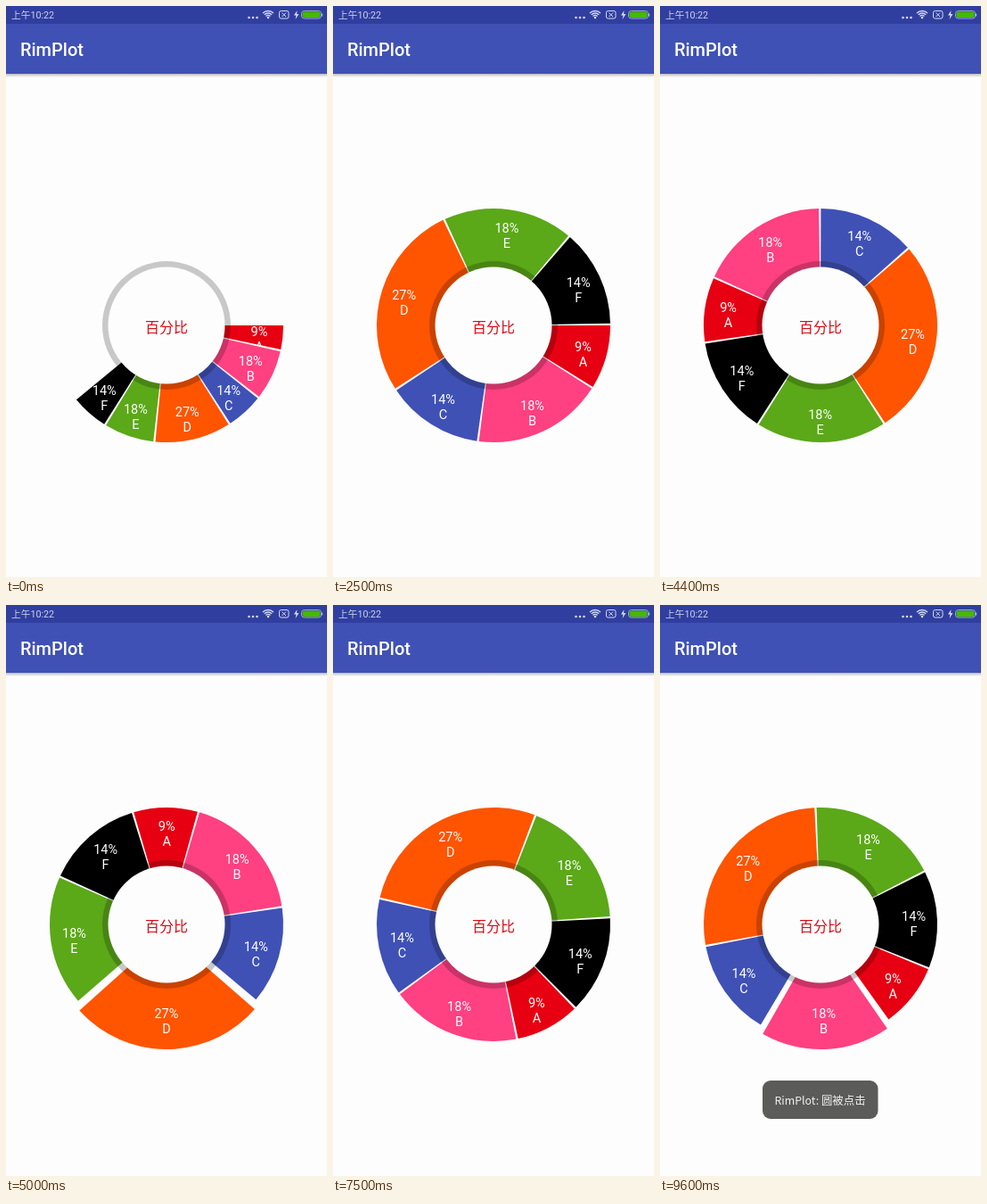
Animation of 360x640 px, one loop 9700 ms. Source, as an HTML page with a canvas:

```html
<!DOCTYPE html>
<html lang="zh">
<head>
<meta charset="utf-8">
<style>
  html, body { margin: 0; width: 100%; height: 100%; overflow: hidden; background: #fdfdfd; }
  canvas { display: block; }
</style>
</head>
<body>
<canvas id="stage" width="360" height="640"></canvas>
<script>
const c = document.getElementById('stage').getContext('2d');
const LOOP = 9700, CX = 180, CY = 358, OUTER = 131, GAP = 1, POP = 9, SPEED = 0.19;
const RAD = Math.PI / 180;
const LATIN = 'Roboto, sans-serif';
const CJK = '"Noto Sans CJK SC", "Noto Sans CJK", sans-serif';
const NAME = 'RimPlot';

const slices = [
  ['A', 1, '#e60012'], ['B', 2, '#ff4081'], ['C', 1.5, '#3f51b5'],
  ['D', 3, '#ff5400'], ['E', 2, '#5ba818'], ['F', 1.5, '#000']
];
const total = slices.reduce((sum, s) => sum + s[1], 0);

// Turns at constant speed: start time, target angle, slice that pops out on arrival
const turns = [[3155, 172, 'E'], [4400, 253.7, 'D'], [5350, 112.6, 'F'], [7150, 22.6, 'B']];

function pose(t) {
  let angle = 0, popped = '';
  for (const [start, target, name] of turns) {
    if (t < start) break;
    const way = target - angle, step = (t - start) * SPEED;
    const done = step >= Math.abs(way);
    angle = done ? target : angle + Math.sign(way) * step;
    popped = done ? name : '';
  }
  return { angle, popped, sweep: Math.min(360, 141.5 + t * 0.36) };
}

function text(str, x, y, font, color, align = 'center') {
  c.font = font;
  c.fillStyle = color;
  c.textAlign = align;
  c.fillText(str, x, y);
}

function disc(x, y, r, color) {
  c.beginPath();
  c.arc(x, y, r, 0, 2 * Math.PI);
  c.fillStyle = color;
  c.fill();
}

function box(x, y, w, h, r) {
  c.beginPath();
  c.roundRect(x, y, w, h, r);
}

function pie(t) {
  const { angle, popped, sweep } = pose(t);
  let from = angle;
  for (const [name, value, color] of slices) {
    const to = from + sweep * value / total, mid = (from + to) / 2 * RAD;
    const dx = Math.cos(mid), dy = Math.sin(mid);
    const shift = name === popped ? POP : 0;
    const x = CX + dx * shift, y = CY + dy * shift;
    c.beginPath();
    c.moveTo(x, y);
    c.arc(x, y, OUTER, from * RAD, (to - GAP) * RAD);
    c.fillStyle = color;
    c.fill();
    const lx = CX + dx * 104.6, ly = CY + dy * 104.6, font = '14.5px ' + LATIN;
    // A label is hidden where the next slice covers it
    text(Math.round(value / total * 100) + '%', lx, ly, font, '#fff');
    text(name, lx, ly + 17, font, '#fff');
    from = to;
  }
  disc(CX, CY, 72, 'rgba(0,0,0,.21)');
  disc(CX, CY, 65.5, '#fdfdfd');
  text('百分比', CX, 366, '16px ' + CJK, '#dc0a14');
}

function statusIcons() {
  const light = '#d5d9ee';
  for (const x of [272.5, 277, 281.5]) disc(x, 13, 1.3, light);

  c.strokeStyle = light;
  c.lineWidth = 1.3;
  for (const r of [3.5, 6, 8.5]) {
    c.beginPath();
    c.arc(294, 14, r, -135 * RAD, -45 * RAD);
    c.stroke();
  }
  disc(294, 13, 1.3, light);

  c.lineWidth = 1;
  box(306.5, 5.5, 10.5, 8.5, 2);
  c.moveTo(309.5, 7.5); c.lineTo(314, 12);
  c.moveTo(314, 7.5); c.lineTo(309.5, 12);
  c.stroke();

  c.beginPath();
  [[326.5, 5], [323, 10.6], [325.4, 10.6], [324.6, 15], [328.4, 9], [326, 9]]
    .forEach(p => c.lineTo(...p));
  c.fillStyle = light;
  c.fill();

  c.strokeStyle = c.fillStyle = '#9fa8cf';
  box(331.5, 5.5, 22, 8.5, 3);
  c.stroke();
  c.fillRect(354, 8.5, 1.2, 3);
  box(332.5, 6.5, 20, 6.5, 2);
  c.fillStyle = '#45b900';
  c.fill();
}

function header() {
  const shade = c.createLinearGradient(0, 76, 0, 80);
  shade.addColorStop(0, 'rgba(0,0,0,.25)');
  shade.addColorStop(1, 'rgba(0,0,0,0)');
  c.fillStyle = shade;
  c.fillRect(0, 76, 360, 4);
  c.fillStyle = '#3f51b5';
  c.fillRect(0, 20, 360, 56);
  c.fillStyle = '#303f9f';
  c.fillRect(0, 0, 360, 20);
  text('上午10:22', 6, 14, '10.7px Roboto, ' + CJK, '#ccd1ea', 'left');
  text(NAME, 16, 55.5, '500 20px ' + LATIN, '#fff', 'left');
  statusIcons();
}

function toast(t) {
  const p = Math.min(1, (t - 8600) / 400);
  if (p <= 0) return;
  c.save();
  c.globalAlpha = p;
  c.translate(0, 30 * (1 - p) ** 2);
  box(115, 533, 129.5, 43, 9);
  c.fillStyle = '#5b5b59';
  c.fill();
  text(NAME + ': 圆被点击', 179.5, 559.5, '300 12.4px ' + CJK, '#f2f2f2');
  c.restore();
}

function draw(now) {
  const t = now % LOOP;
  c.fillStyle = '#fdfdfd';
  c.fillRect(0, 0, 360, 640);
  pie(t);
  header();
  toast(t);
}

let begin;
function tick(now) {
  begin ??= now;
  draw(now - begin);
  requestAnimationFrame(tick);
}
requestAnimationFrame(tick);
</script>
</body>
</html>
```
